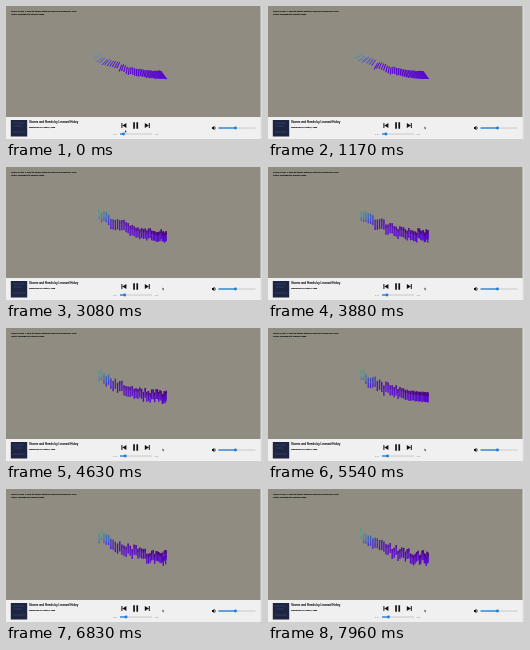
Recreate the animation shown at these times as an HTML page. Size 256 by 133 pixels, loop 8000 ms.

```html
<!DOCTYPE html>
<html lang="en">
<head>
<meta charset="utf-8">
<title>Music bars</title>
<style>
  html, body { margin: 0; width: 100%; height: 100%; overflow: hidden; background: #908c82; }
  svg { display: block; width: 100%; height: 100%; }
  text { font-family: "Liberation Sans", Arial, sans-serif; fill: #111; }
  .dark { stroke: #111; stroke-width: .12; }
</style>
</head>
<body>
<svg viewBox="0 0 256 133">
  <defs>
    <linearGradient id="spectrum" gradientUnits="userSpaceOnUse" x1="93" y1="43" x2="101" y2="63">
      <stop offset="0" stop-color="#38bf8c"/>
      <stop offset=".2" stop-color="#429fb2"/>
      <stop offset=".45" stop-color="#4468cc"/>
      <stop offset=".72" stop-color="#4630cc"/>
      <stop offset="1" stop-color="#5806d2"/>
    </linearGradient>
  </defs>
  <rect width="256" height="133" fill="#908c82"/>
  <g font-size="2.35" class="dark">
    <text x="5" y="5.8">*Click or use 4 keys to toggle between bars and frequency view</text>
    <text x="5" y="9.2">*Pitch equalized to orange class</text>
  </g>
  <g id="bars" fill="url(#spectrum)"></g>

  <rect y="111" width="256" height="22" fill="#f0f0f0"/>
  <rect x="254.5" width="1.5" height="133" fill="#dcdcdc"/>
  <rect x="4.8" y="114" width="16.4" height="16.5" fill="#1f2540"/>
  <path d="M7 117h11M8 120h8M7 126h12" stroke="#2f4470" stroke-width=".8"/>
  <text x="23" y="117.1" font-size="3" class="dark">Stones and Reeds by Leonard Hobry</text>
  <text x="23" y="121.6" font-size="2.1" class="dark">Wandering by Lantern, 1988</text>

  <g fill="#111">
    <path d="M115.4 117h1v5h-1zM120.4 117v5l-4-2.5z"/>
    <path d="M127.2 116.3h1.7v6.4h-1.7zM130.4 116.3h1.7v6.4h-1.7z"/>
    <path d="M143.8 117h-1v5h1zM138.8 117v5l4-2.5z"/>
    <path d="M206 121h1l1.4-1.3v4.6l-1.4-1.3h-1z"/>
    <path d="M209 120.7q1.2 1.3 0 2.6" fill="none" stroke="#111" stroke-width=".5"/>
  </g>
  <g font-size="2" opacity=".55">
    <text id="elapsed" x="107" y="128.6"></text>
    <text x="148.5" y="128.6">2:31</text>
  </g>
  <path d="M114 128h32M212.5 122h37" stroke="#c8c8c8" stroke-width="1"/>
  <path d="M212.5 122h17" stroke="#147be0" stroke-width="1.2"/>
  <circle cx="229.5" cy="122" r="1.4" fill="#147be0"/>
  <path id="played" stroke="#147be0" stroke-width="1.2"/>
  <circle id="thumb" cy="128" r="1.4" fill="#147be0"/>
  <path id="cursor" d="M0 0v2.4l.6-.5.5 1 .4-.2-.5-1h.8z" fill="#111" stroke="#fff" stroke-width=".15"/>
</svg>
<script>
const LOOP = 8000, FPS = 24, COUNT = 40;
const VANISH = { x: 127, y: 26 };
const $ = id => document.getElementById(id);
const mix = (a, b, k) => a + (b - a) * k;
const clamp = k => Math.min(1, Math.max(0, k));
const ease = k => (k = clamp(k)) * k * (3 - 2 * k);

// Piecewise-linear value through [position, value] points
function track(points, at) {
  for (let i = 1; i < points.length; i++) {
    const [a, from] = points[i - 1], [b, to] = points[i];
    if (at <= b) return mix(from, to, clamp((at - a) / (b - a)));
  }
  return points.at(-1)[1];
}

function hash(a, b) {
  const s = Math.sin(a * 127.1 + b * 311.7) * 43758.5453;
  return s - Math.floor(s);
}

function noise(bar, time) {
  const step = Math.floor(time);
  return mix(hash(bar, step), hash(bar, step + 1), ease(time - step)) * 2 - 1;
}

const LOUDNESS = [[0, .8], [1170, .3], [3080, 2.2], [4630, 3], [5540, .4],
                  [6000, 2.2], [6830, 4.5], [8000, 3.5]];

function addPolygon(fill) {
  const shape = document.createElementNS("http://www.w3.org/2000/svg", "polygon");
  if (fill) shape.setAttribute("fill", fill);
  return $("bars").appendChild(shape);
}

// Each bar is a lit body with a shaded upper part
const bars = Array.from({ length: COUNT }, () => ({ body: addPolygon(), shade: addPolygon("#420a3c") }));

const setPoints = (shape, points) =>
  shape.setAttribute("points", points.map(p => p.map(n => n.toFixed(2))).join(" "));

function drawBar({ body, shade }, i, t, front) {
  const u = i / (COUNT - 1);
  const level = track(LOUDNESS, t);
  const loud = mix(Math.max(3, level), level, ease((u - .3) / .3));
  const shift = noise(i, t / 240) * loud * mix(.6, 1, front);
  const spread = 1 - (1 - u) ** 1.4;
  const x = mix(mix(85, 92.5, front), 159.4, spread);
  const width = mix(mix(1.1, 1.8, u), 1.35, front);
  const bottom = mix(73, 74, front) - 21 * (1 - spread) ** 2 + shift;
  const height = mix(10.5, 9.5, u);

  // The far edge recedes to the vanishing point until the view turns frontal
  const far = (px, py) => [
    mix(mix(px, VANISH.x, .17), px, front),
    mix(mix(py, VANISH.y, .17), py - height, front)
  ];
  const left = [x, bottom], right = [x + width, bottom];
  const farLeft = far(...left), farRight = far(...right);
  const between = (a, b) => a.map((n, axis) => mix(n, b[axis], .65));

  setPoints(body, [left, right, farRight, farLeft]);
  setPoints(shade, [between(left, farLeft), between(right, farRight), farRight, farLeft]);
  shade.setAttribute("opacity", front * mix(.1, .7, spread));
}

function draw(now) {
  const t = Math.floor(now % LOOP * FPS / 1000) * 1000 / FPS;
  const front = ease((t - 2000) / 800);
  bars.forEach((bar, i) => drawBar(bar, i, t, front));

  const head = 117.5 + 3 * t / LOOP;
  $("played").setAttribute("d", `M114 128H${head}`);
  $("thumb").setAttribute("cx", head);
  $("elapsed").textContent = "0:" + String(14 + Math.floor(t / 1000)).padStart(2, "0");

  const move = ease((t - 100) / 700);
  $("cursor").setAttribute("transform", `translate(${mix(119, 156.5, move)} ${mix(124, 120.5, move)})`);
  requestAnimationFrame(() => draw(performance.now() - start));
}

const start = performance.now();
draw(0);
</script>
</body>
</html>
```
